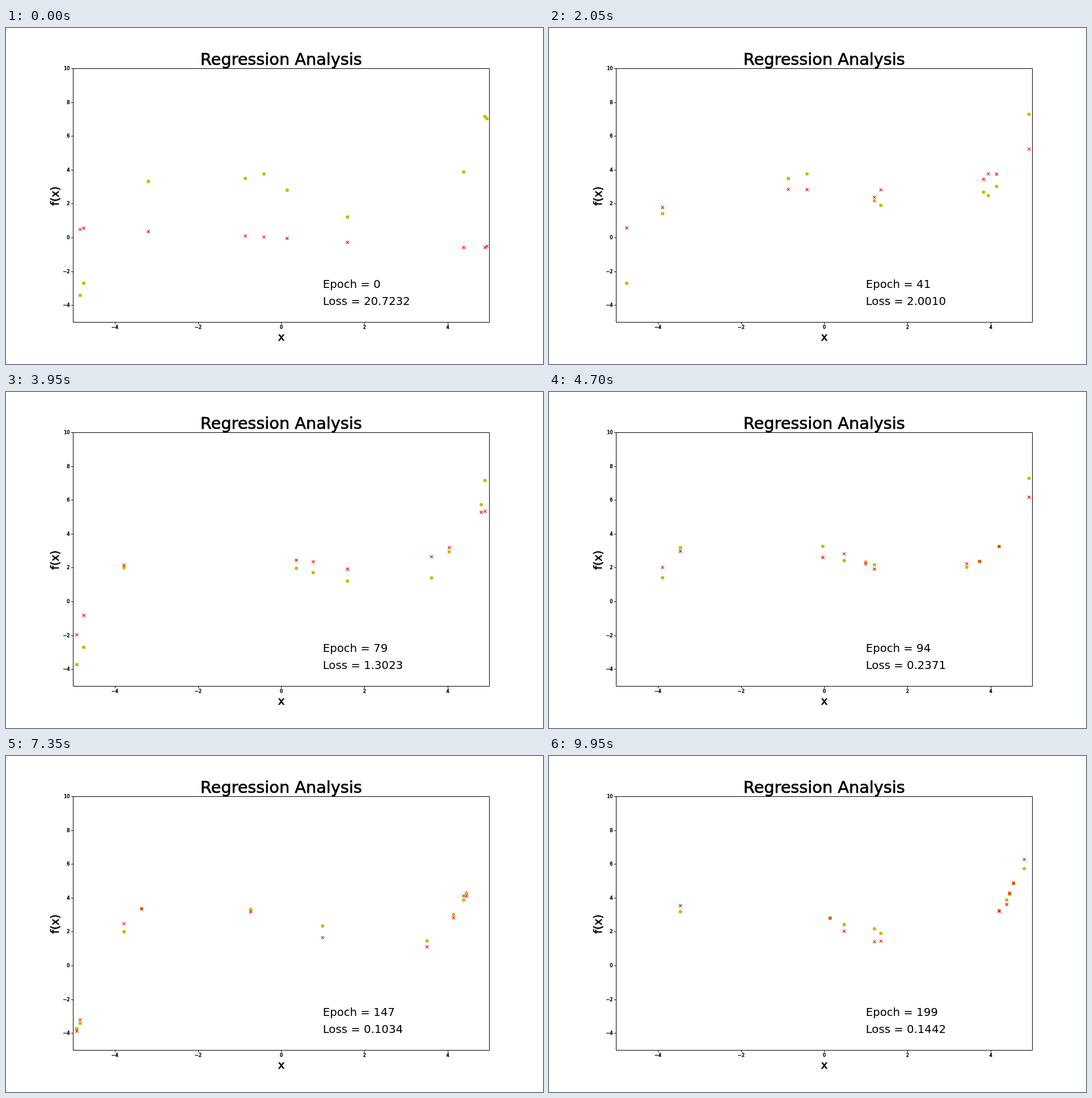
Recreate the animation shown at these times as an HTML page. Size 947 px wide and 592 px high, loop 10 s.

```html
<!DOCTYPE html>
<html lang="en">
<head>
<meta charset="utf-8">
<title>Regression Analysis</title>
<style>
  html, body { margin: 0; width: 100%; height: 100%; overflow: hidden; background: #fff; }
  svg { display: block; width: 947px; height: 592px; }
  text { font-family: "DejaVu Sans", sans-serif; fill: #000; }
  .heavy { stroke: #000; stroke-width: .7px; }
  .tick { font-size: 8.22px; stroke-width: .55px; }
  .label { font-size: 19.73px; }
  .title { font-size: 28.77px; }
  .mid { text-anchor: middle; }
  .end { text-anchor: end; }
  #axes { fill: none; stroke: #000; }
  #dots { fill: #bfbf00; }
  #crosses { fill: none; stroke: #f00; stroke-width: 1.25; }
</style>
</head>
<body>
<svg viewBox="0 0 947 592">
  <g id="dots"></g>
  <path id="crosses"/>
  <path id="axes"/>
  <g id="ticks"></g>
  <text class="title heavy mid" x="485.3" y="65.2">Regression Analysis</text>
  <text class="label heavy mid" x="485.6" y="551">x</text>
  <text class="label heavy mid" transform="translate(92.5 296) rotate(-90)">f(x)</text>
  <text class="label" id="epoch" x="558.7" y="458.3"></text>
  <text class="label" id="loss" x="558.7" y="488.2"></text>
</svg>
<script>
const $ = id => document.getElementById(id);
const STEP = 50, EPOCHS = 200, BATCH = 10;

const toX = x => 485.3 + 73.39 * x;
const toY = y => 369 - 29.8 * y;
const mix = (a, b, k) => a + (b - a) * k;
const clamp = k => Math.min(1, Math.max(0, k));

function random(seed) {
  let s = seed;
  return () => {
    s = s + 0x6D2B79F5 | 0;
    let t = Math.imul(s ^ s >>> 15, 1 | s);
    t = t + Math.imul(t ^ t >>> 7, 61 | t) ^ t;
    return ((t ^ t >>> 14) >>> 0) / 4294967296;
  };
}

// Roughly normal noise around zero
const noise = (rnd, size) => (rnd() + rnd() + rnd() - 1.5) * 2 * size;

// What is learnt, and the model's straight and bent stages on the way there
const truth = x => 2.6 - 0.9 * x + 0.0235 * x ** 3 - 0.002 * x ** 4 + 0.0024 * x ** 5;
const start = x => -0.12 * x;
const bend = x => 2.7 + 0.018 * x ** 3;

const rise = epoch => 1 - (1 - clamp(epoch / 40)) ** 1.6;
const settle = epoch => 1 - (1 - clamp((epoch - 35) / 110)) ** 1.5;

function predict(x, epoch) {
  return mix(mix(start(x), bend(x), rise(epoch)), truth(x), settle(epoch));
}

// Three clumps of samples; the outer two crowd towards the plot's sides
function makeData() {
  const rnd = random(7), data = [];
  const clump = (count, from, to, power) => {
    for (let i = 0; i < count; i++) {
      const x = mix(from, to, ((i + rnd() * 0.6) / count) ** power);
      data.push({ x, y: truth(x) + noise(rnd, 0.4) * (i ? 1 : 0.2) });
    }
  };
  clump(15, -4.91, -3.05, 1.3);
  clump(14, -0.9, 1.8, 1.2);
  clump(22, 4.95, 3.2, 1.5);
  return data;
}

const data = makeData();

function batch(epoch) {
  const rnd = random(epoch * 977 + 13), pool = data.slice();
  return Array.from({ length: BATCH }, () => {
    const [{ x, y }] = pool.splice(Math.floor(rnd() * pool.length), 1);
    return { x, y, guess: predict(x, epoch) + noise(rnd, mix(0.05, 0.2, rise(epoch))) };
  });
}

function drawAxes() {
  let d = "M118.5 71.5H852.5V518.5H118.5Z", labels = "";
  const label = (v, x, y, align) => {
    labels += `<text class="heavy tick ${align}" x="${x}" y="${y}">${String(v).replace("-", "\u2212")}</text>`;
  };
  const snap = v => Math.floor(v + 0.5) + 0.5;
  for (let v = -4; v <= 4; v += 2) {
    d += `M${snap(toX(v))} 518.5v3.4`;
    label(v, toX(v) + 0.3, 530, "mid");
  }
  for (let v = -4; v <= 10; v += 2) {
    const y = snap(toY(v));
    d += `M118.5 ${y}h-3.4`;
    label(v, 112.6, y + 2.7, "end");
  }
  $("axes").setAttribute("d", d);
  $("ticks").innerHTML = labels;
}

let shown = -1;
function draw(epoch) {
  if (epoch === shown) return;
  shown = epoch;
  const points = batch(epoch), r = 2.5;
  const loss = points.reduce((sum, p) => sum + (p.guess - p.y) ** 2, 0) / BATCH;
  $("dots").innerHTML = points.map(p =>
    `<circle cx="${toX(p.x)}" cy="${toY(p.y)}" r="3.05"/>`).join("");
  $("crosses").setAttribute("d", points.map(p =>
    `M${toX(p.x) - r} ${toY(p.guess) - r}l${2 * r} ${2 * r}m0 ${-2 * r}l${-2 * r} ${2 * r}`).join(""));
  $("epoch").textContent = "Epoch = " + epoch;
  $("loss").textContent = "Loss = " + loss.toFixed(4);
}

function tick() {
  draw(Math.floor(performance.now() / STEP) % EPOCHS);
  requestAnimationFrame(tick);
}

drawAxes();
tick();
</script>
</body>
</html>
```
